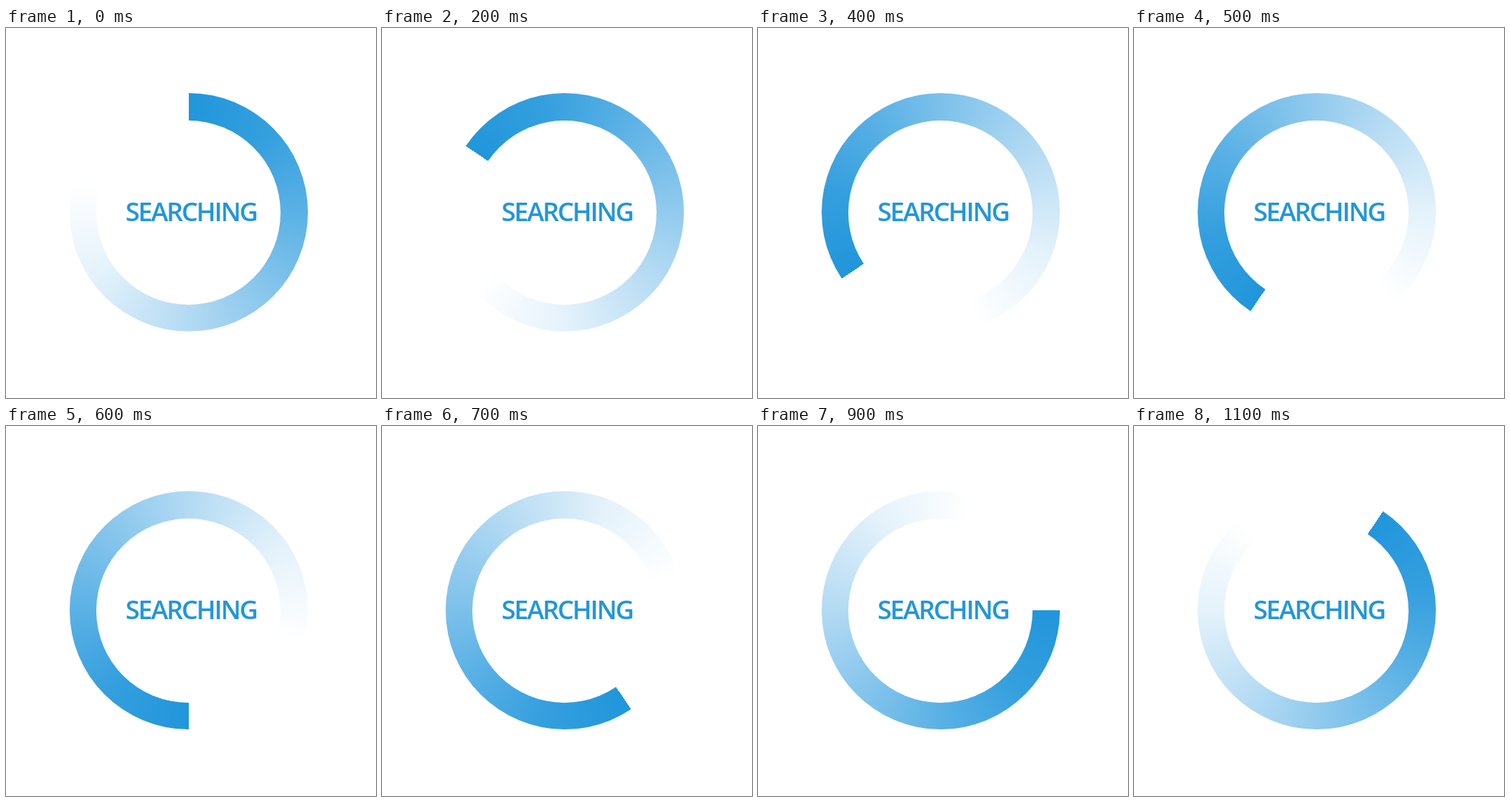
These frames come from a looping animation (500 px wide and 500 px high, 1200 ms). An HTML page:

```html
<!DOCTYPE html>
<html lang="en">
<head>
<meta charset="utf-8">
<title>Searching</title>
<style>
  html, body { margin: 0; width: 100%; height: 100%; overflow: hidden; background: #fff; }
  #ring, #hole { position: absolute; border-radius: 50%; }
  #ring {
    left: 86px; top: 88px; width: 322px; height: 322px;
    background: conic-gradient(from var(--head, 0deg),
      #2196db 0deg, #349fde 45deg, #5ab1e5 90deg, #b3daf3 180deg,
      #e4f2fb 236deg, #fff 286deg);
  }
  #hole { left: 122px; top: 125px; width: 249px; height: 249px; background: #fff; }
  svg { position: absolute; left: 0; top: 0; }
  text { font: 600 35px "Open Sans", sans-serif; letter-spacing: -2.1px; fill: #2196db; }
</style>
</head>
<body>
<div id="ring"></div>
<div id="hole"></div>
<svg width="500" height="500"><text x="161.4" y="260.5">SEARCHING</text></svg>
<script>
  const ring = document.getElementById("ring");
  const LOOP = 1200, STEPS = 12, SLOTS = 32;

  // Twelve steps per turn, each snapped to one of 32 angular slots.
  function draw(now) {
    const step = Math.floor((now % LOOP) / (LOOP / STEPS));
    const slot = Math.round(step * SLOTS / STEPS);
    ring.style.setProperty("--head", -slot * 360 / SLOTS + "deg");
  }

  const start = performance.now();
  function tick() {
    draw(performance.now() - start);
    requestAnimationFrame(tick);
  }
  tick();
</script>
</body>
</html>
```
